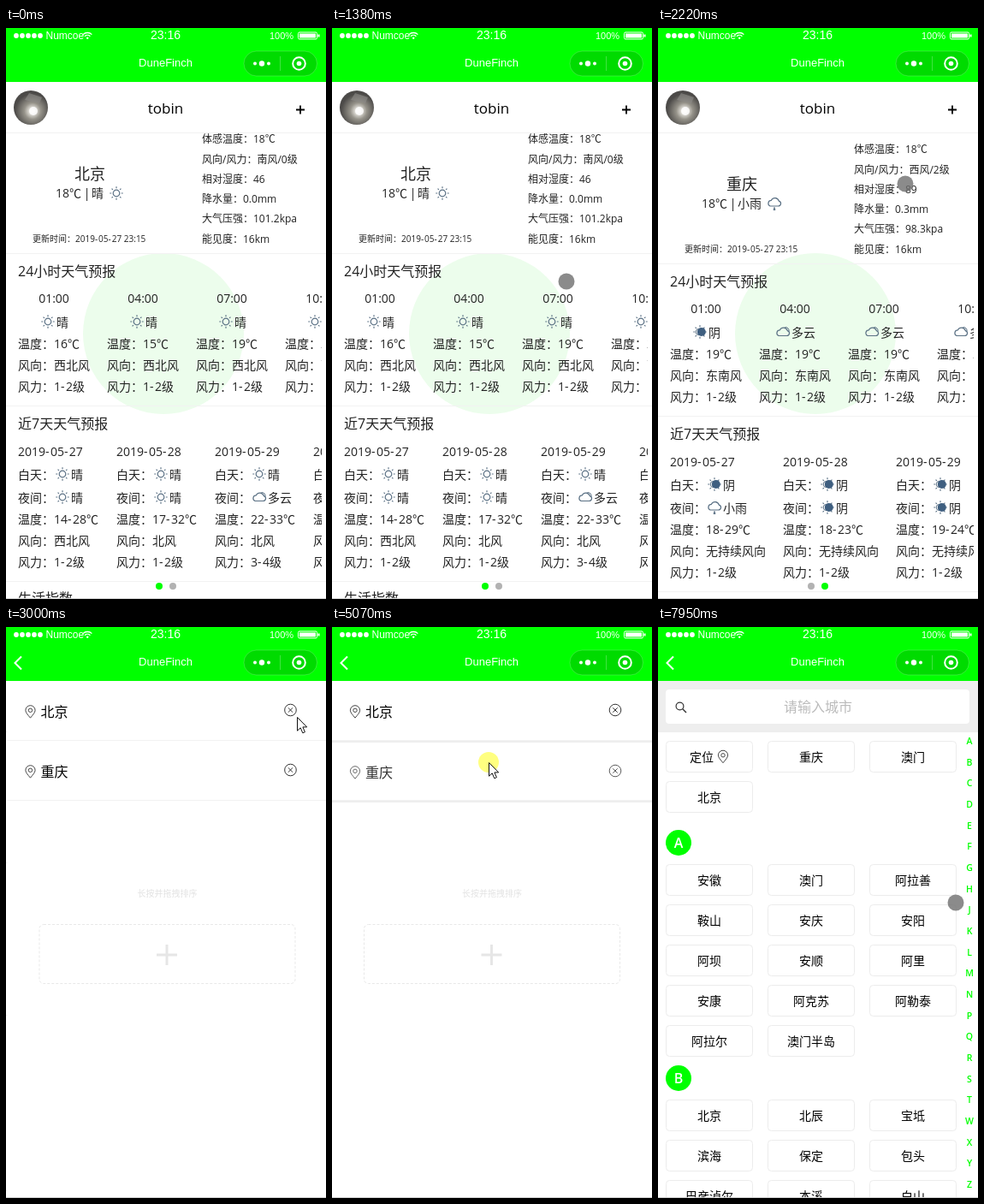
An HTML page that plays this animation: 374x667 px, repeating every 8000 ms.

```html
<!DOCTYPE html>
<html lang="zh-CN">
<head>
<meta charset="utf-8">
<title>Weather</title>
<style>
html, body { margin: 0; width: 100%; height: 100%; overflow: hidden; background: #fff; }
svg { display: block; font-family: "Open Sans", "Noto Sans CJK SC", "Noto Sans CJK", sans-serif; }
.bar { font-family: "Liberation Sans", sans-serif; }
</style>
</head>
<body>
<svg id="stage" width="374" height="667" viewBox="0 0 374 667"></svg>
<script>
const LOOP = 8000, GREEN = '#00ff00', SLATE = '#5a7084';

// ---- drawing helpers ----
const wide = s => s.replace(/-/g, '<tspan letter-spacing=".1em">-</tspan>');
const text = (x, y, size, s, more = '') =>
  `<text x="${x}" y="${y}" font-size="${size}" ${more}>${wide(s)}</text>`;
const mid = (x, y, size, s, more = '') => text(x, y, size, s, 'text-anchor="middle" ' + more);
const rect = (x, y, w, h, fill, more = '') =>
  `<rect x="${x}" y="${y}" width="${w}" height="${h}" fill="${fill}" ${more}/>`;
const disc = (x, y, r, fill, more = '') =>
  `<circle cx="${x}" cy="${y}" r="${r}" fill="${fill}" ${more}/>`;
const line = (d, stroke, w, more = '') =>
  `<path d="${d}" fill="none" stroke="${stroke}" stroke-width="${w}" ${more}/>`;
const group = (id, body, more = '') => `<g id="${id}" ${more}>${body}</g>`;
const at = (x, y, body) => `<g transform="translate(${x} ${y})">${body}</g>`;
const rule = y => rect(0, y, 374, 1, '#f2f2f2');

const pin = (x, y) => at(x, y,
  line('M0 7.2C-3 3.4-5.6 1-5.6-1.7A5.6 5.6 0 0 1 5.6-1.7C5.6 1 3 3.4 0 7.2Z', '#444', 1) +
  disc(0, -1.7, 2.2, 'none', 'stroke="#444"'));

const CLOUD = 'M-5 4.5H4.5a3 3 0 0 0 .8-5.9A4.8 4.8 0 0 0-3.6-2.2 3.5 3.5 0 0 0-5 4.5Z';
function rays() {
  let d = '';
  for (let i = 0; i < 8; i++) {
    const c = Math.cos(i * Math.PI / 4), s = Math.sin(i * Math.PI / 4);
    d += `M${(c * 5.8).toFixed(2)} ${(s * 5.8).toFixed(2)}L${(c * 7.7).toFixed(2)} ${(s * 7.7).toFixed(2)}`;
  }
  return line(d, SLATE, 1.2);
}
const ICONS = {
  晴: rays() + disc(0, 0, 3.8, 'none', `stroke="${SLATE}" stroke-width="1.2"`),
  阴: rays() + disc(-1.2, 0, 3.6, '#fff', `stroke="${SLATE}"`) + disc(1.8, 0, 5, '#3f5f80'),
  多云: line(CLOUD, SLATE, 1.2) + line('M2.5-5.4A4 4 0 0 1 7-.6', SLATE, 1),
  小雨: at(0, -1.5, line(CLOUD, SLATE, 1.2)) + line('M0 4.5L-1 7.5H1Z', SLATE, 1)
};
const icon = (kind, x, y) => at(x, y, ICONS[kind]);

// ---- weather pages ----
const north = {
  city: '北京', x: 58, now: ['18℃', '晴'], scroll: 12, pitch: 115,
  facts: ['18℃', '南风/0级', '46', '0.0mm', '101.2kpa', '16km'],
  sky: '晴', wind: '西北风', temps: [16, 15, 19, 25, 27, 25, 21, 18],
  days: [['晴', '晴', '14-28℃', '西北风', '1-2级'], ['晴', '晴', '17-32℃', '北风', '1-2级'],
         ['晴', '多云', '22-33℃', '北风', '3-4级'], ['晴', '晴', '19-32℃', '北风', '1-2级']]
};
const south = {
  city: '重庆', x: 51, now: ['18℃', '小雨'], scroll: 0, pitch: 132,
  facts: ['18℃', '西风/2级', '89', '0.3mm', '98.3kpa', '16km'],
  sky: '多云', wind: '东南风', temps: [19, 19, 19, 22, 25, 24, 22, 20],
  days: [['阴', '小雨', '18-29℃', '无持续风向', '1-2级'], ['阴', '阴', '18-23℃', '无持续风向', '1-2级'],
         ['阴', '阴', '19-24℃', '无持续风向', '1-2级']]
};
const LABELS = ['体感温度', '风向/风力', '相对湿度', '降水量', '大气压强', '能见度'];

function hour(p, temp, i) {
  const x = 14 + i * 104, c = x + 43;
  const sky = p === south && i === 0 ? '阴' : p.sky;
  const left = c - (18 + sky.length * 14) / 2;
  return mid(c - 1, 333, 14, String(1 + i * 3).padStart(2, '0') + ':00') +
    icon(sky, left + 8, 355) + text(left + 18, 361, 14, sky) +
    text(x, 386, 14, `温度：${temp}℃`) +
    text(x, 411, 14, '风向：' + p.wind) +
    text(x, 436, 14, '风力：1-2级');
}
function day(p, d, i) {
  const x = 14 + i * p.pitch;
  const sky = (label, kind, y) => text(x, y, 14, label + '：') +
    icon(kind, x + 52, y - 6) + text(x + 62, y, 14, kind);
  return text(x, 512, 14, '2019-05-' + (27 + i)) +
    sky('白天', d[0], 539) + sky('夜间', d[1], 566) +
    ['温度', '风向', '风力'].map((s, k) => text(x, 591 + k * 25, 14, s + '：' + d[k + 2])).join('');
}
function weather(p, id) {
  const end = p.x + 42 + p.now[1].length * 14;
  return at(0, -p.scroll,
    mid(98, 188.5, 18, p.city) +
    text(p.x, 210, 14, p.now[0]) + mid(p.x + 36.5, 210, 14, '|') +
    text(p.x + 42, 210, 14, p.now[1]) + icon(p.now[1], end + 15, 205) +
    text(31, 262, 10, '更新时间：2019-05-27 23:15') +
    LABELS.map((s, i) => text(229, 146.2 + i * 23.3, 12, s + '：' + p.facts[i])).join('') +
    rule(275) + text(14, 302, 16, '24小时天气预报') +
    `<g clip-path="url(#lane)">${group(id, p.temps.map((v, i) => hour(p, v, i)).join(''))}</g>` +
    rule(453) + text(14, 480, 16, '近7天天气预报') +
    `<g clip-path="url(#lane)">${p.days.map((d, i) => day(p, d, i)).join('')}</g>` +
    rule(658) + text(14, 684, 16, '生活指数'));
}

const avatar = disc(29, 93, 20, 'url(#photo)') +
  '<path d="M22 84L27 76L42 81L39 88Z" fill="#8d8c88" opacity=".6"/>' + disc(32, 97, 5, '#fff', 'opacity=".8"');
const home =
  rect(0, 63, 374, 604, '#fff') + disc(184, 357, 94, '#ecfdec') +
  `<g clip-path="url(#body)">${group('swiper', weather(north, 'hours') + at(374, 0, weather(south, 'hours2')))}</g>` +
  disc(179, 652, 4, GREEN, 'id="dot0"') + disc(195, 652, 4, GREEN, 'id="dot1"') +
  rule(122) + avatar +
  mid(186.5, 100, 17, 'tobin', 'fill="#000"') + line('M339 95.5H349M344 90.5V100.5', '#000', 1.8);

// ---- saved cities ----
const row = (id, city) => group(id,
  rect(0, 63, 374, 69, '#fff') +
  pin(27, 99) + text(39, 105, 16, city) +
  disc(331, 97, 6.8, 'none', 'stroke="#333"') +
  line('M328.3 94.3l5.4 5.4m0-5.4l-5.4 5.4', '#333', 1));
const list =
  rect(0, 63, 374, 604, '#fff') + row('rowA', '北京') + row('rowB', '重庆') +
  group('edge', rect(0, 131, 374, 3, '#eee') + rect(0, 61, 374, 3, '#eee')) +
  rule(132) + rule(202) +
  mid(187, 314.5, 10, '长按并拖拽排序', 'fill="#e2e2e2"') +
  rect(37.5, 347.5, 299, 69, 'none', 'rx="5" stroke="#e8e8e8" stroke-dasharray="3 2"') +
  line('M174.5 383H198.5M186.5 371V395', '#e6e6e6', 3);

// ---- city picker ----
const grid = (names, y0) => names.split(' ').map((s, i) => {
  const x = 9.5 + i % 3 * 119, y = y0 + Math.floor(i / 3) * 47;
  const body = s === '定位' ? text(37, y + 23.5, 14, s) + pin(76, y + 18) : mid(x + 50.5, y + 23.5, 14, s);
  return rect(x, y, 101, 36, '#fff', 'rx="4" stroke="#ececec"') + body;
}).join('');
const initial = (s, y) => disc(24, y, 15, GREEN) + mid(24, y + 6, 16, s, 'fill="#fff" font-weight="600"');
const picker =
  rect(0, 63, 374, 604, '#fff') + rect(0, 63, 374, 60, '#eee') +
  rect(9, 73, 355, 40, '#fff', 'rx="4"') +
  disc(25.5, 92.5, 4.4, 'none', 'stroke="#333" stroke-width="1.2"') + line('M28.8 95.8L33 100', '#333', 1.4) +
  mid(187, 99, 16, '请输入城市', 'fill="#bbb"') +
  grid('定位 重庆 澳门 北京', 133.5) + initial('A', 252) +
  grid('安徽 澳门 阿拉善 鞍山 安庆 安阳 阿坝 安顺 阿里 安康 阿克苏 阿勒泰 阿拉尔 澳门半岛', 277.5) +
  initial('B', 527) +
  grid('北京 北辰 宝坻 滨海 保定 包头 巴彦淖尔 本溪 白山', 552.5) +
  [...'ABCDEFGHJKLMNPQRSTWXYZ'].map((s, i) =>
    mid(364, 137 + i * 24.67, 10.5, s, `fill="${GREEN}" font-weight="600"`)).join('');

// ---- top bar ----
const bar =
  rect(0, 0, 374, 63, GREEN) +
  [12, 19, 26, 33, 40].map(x => disc(x, 9, 2.9, '#fff')).join('') +
  text(46.5, 13, 12, 'Numcoe') +
  line('M90 7.6a7.5 7.5 0 0 1 10.4 0M92 9.7a4.6 4.6 0 0 1 6.4 0', '#fff', 1.3) + disc(95.2, 11.8, 1.2, '#fff') +
  mid(186.5, 13, 14, '23:16') + text(308, 13, 11, '100%') +
  rect(341.5, 5, 22, 8, 'none', 'rx="1.5" stroke="#fff"') + rect(343, 6.5, 19, 5, '#fff') +
  rect(364.5, 7.5, 2, 3, '#fff') +
  mid(186.5, 45, 13, 'DuneFinch') +
  group('back', line('M18 34.5L10.5 42L18 49.5', '#fff', 2)) +
  rect(278, 27, 85.5, 29, '#000', 'rx="14.5" fill-opacity=".14" stroke="#fff" stroke-opacity=".2"') +
  rect(320, 33, 1, 17, '#fff', 'opacity=".25"') +
  disc(291, 41.5, 2, '#fff') + disc(299, 41.5, 3.2, '#fff') + disc(307, 41.5, 2, '#fff') +
  disc(342.5, 41.5, 7.3, 'none', 'stroke="#fff" stroke-width="2"') + disc(342.5, 41.5, 2.8, '#fff');

document.getElementById('stage').innerHTML =
  `<defs>
    <clipPath id="lane"><rect x="5" y="280" width="364" height="400"/></clipPath>
    <clipPath id="body"><rect y="123" width="374" height="544"/></clipPath>
    <radialGradient id="photo" cx=".55" cy=".6" r=".6">
      <stop offset=".1" stop-color="#f2f0ea"/><stop offset=".4" stop-color="#96938a"/>
      <stop offset=".85" stop-color="#4c4a48"/>
    </radialGradient>
  </defs>` +
  group('home', home, 'fill="#222"') + group('list', list) + group('picker', picker) +
  rect(0, 666, 374, 1, '#d0d0d0') +
  group('bar', bar, 'class="bar" fill="#fff"') +
  disc(0, 0, 9.5, '#6e6e6e', 'id="touch" fill-opacity=".8"') +
  disc(0, 0, 12, '#ffff80', 'id="press" style="mix-blend-mode:multiply"') +
  group('mouse', '<path d="M.5.5V16.2L4.2 12.8 6.8 18.8 9.4 17.7 6.9 11.9H11.7Z" fill="#fff" stroke="#111"/>');

// ---- motion ----
const el = {};
document.querySelectorAll('svg [id]').forEach(e => el[e.id] = e);
const move = (e, x, y = 0) => e.setAttribute('transform', `translate(${x.toFixed(2)} ${y.toFixed(2)})`);
const show = (e, on) => e.setAttribute('visibility', on ? 'visible' : 'hidden');
const clamp = v => Math.min(1, Math.max(0, v));
const smooth = v => v * v * (3 - 2 * v);
const out = v => 1 - (1 - v) ** 3;
const part = (t, a, b) => clamp((t - a) / (b - a));

// keys: [time, x, y], eased between neighbours
function along(t, keys) {
  let i = 0;
  while (i < keys.length - 2 && t >= keys[i + 1][0]) i++;
  const [a, b] = [keys[i], keys[i + 1]], k = smooth(part(t, a[0], b[0]));
  return [a[1] + (b[1] - a[1]) * k, a[2] + (b[2] - a[2]) * k];
}
const TOUCH = [[70, 300, 575], [220, 290, 375], [520, 110, 380], [670, 110, 380], [1220, 274, 302],
  [1360, 274, 302], [1380, 274, 296], [1700, 110, 290], [1800, 110, 290], [2220, 289, 182], [2530, 344, 101]];
const TOUCH_END = [[7490, 205, 392], [7950, 348, 322]];
const MOUSE = [[3000, 340, 105], [3540, 215, 259], [3690, 171, 213], [4150, 183, 158],
  [5070, 183, 158], [5460, 186, 94], [5610, 186, 94], [6400, 214, 377]];

function draw(t) {
  move(el.hours, -180 * (smooth(part(t, 220, 520)) - smooth(part(t, 670, 1220))));

  const drag = -164 * smooth(part(t, 1380, 1700));
  move(el.swiper, drag - 210 * out(part(t, 1710, 2180)));
  const second = t >= 1720;
  el.dot0.setAttribute('fill', second ? '#b2b2b2' : GREEN);
  el.dot1.setAttribute('fill', second ? GREEN : '#b2b2b2');

  show(el.back, t >= 2770);
  move(el.list, 374 * (1 - out(part(t, 2740, 3050))));
  move(el.picker, 374 * (1 - out(part(t, 7070, 7320))));

  const held = t >= 4540 && t < 5610;
  const y = t < 4540 ? 70 : 71 - 64 * smooth(part(t, 5070, 5460)) - 7 * out(part(t, 5610, 5760));
  move(el.rowB, 0, y);
  move(el.edge, 0, y);
  move(el.rowA, 0, 70 * smooth(part(t, 5230, 5400)));
  el.rowB.setAttribute('opacity', held ? 0.8 : 1);
  show(el.edge, held);

  const late = t >= 7490;
  show(el.touch, late || (t >= 70 && t < 2900));
  move(el.touch, ...along(t, late ? TOUCH_END : TOUCH));
  const m = along(t, MOUSE);
  show(el.mouse, t >= 3000 && t < 7110);
  move(el.mouse, ...m);
  show(el.press, (t >= 5070 && t < 5610) || (t >= 6790 && t < 6860));
  move(el.press, ...m);
}

const start = performance.now();
function tick() {
  draw((performance.now() - start) % LOOP);
  requestAnimationFrame(tick);
}
tick();
</script>
</body>
</html>
```
